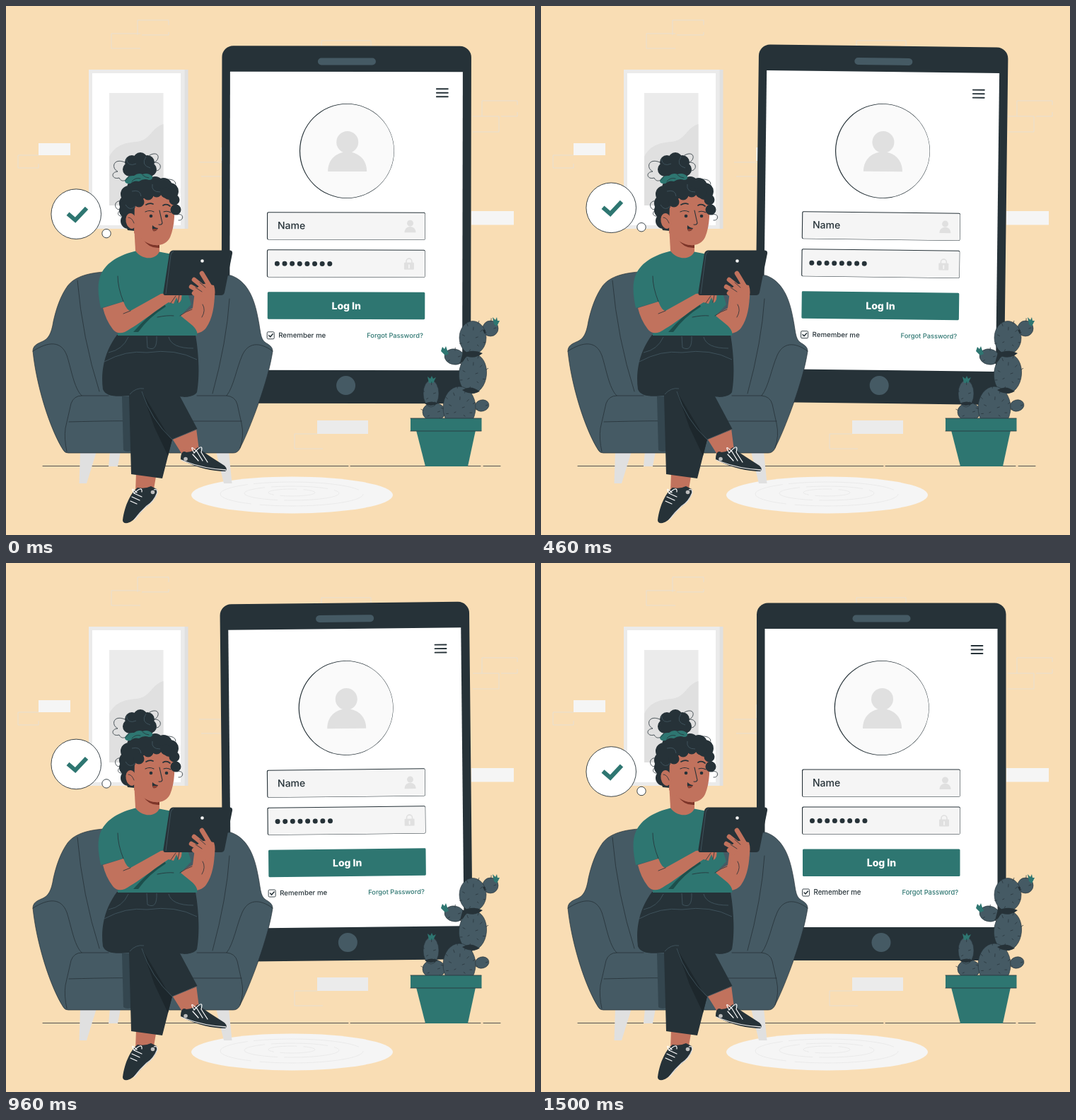
An HTML page for the animation above (1.54 s loop, 748 px wide and 748 px high).

```html
<!DOCTYPE html>
<html lang="en">
<head>
<meta charset="utf-8">
<title>Log in</title>
<style>
  html, body { margin: 0; height: 100%; overflow: hidden; background: #f9ddb4; }
  svg { display: block; width: 100vw; height: 100vh; font-family: Inter, sans-serif; }
  .dark { fill: #263238; }
  .slate { fill: #455a64; }
  .teal { fill: #2e7671; }
  .skin { fill: #c1725d; }
  .white { fill: #fff; }
  .pale { fill: #f5f5f5; }
  .light { fill: #ebebeb; }
  .grey { fill: #e0e0e0; }
  .line { fill: none; stroke: #263238; stroke-width: .8; stroke-linecap: round; }
  .seam { fill: none; stroke: #455a64; stroke-width: .8; }
  .faint { fill: none; stroke: #e8dfd0; }
  .lace { fill: none; stroke: #fff; stroke-width: 1.2; stroke-linecap: round; }
  .curls { fill: none; stroke: #263238; stroke-linecap: round; }
  .edge { stroke: #263238; stroke-width: .9; }
</style>
</head>
<body>
<svg viewBox="0 0 748 748">
  <rect width="748" height="748" fill="#f9ddb4"/>

  <g id="wall">
    <path class="faint" d="M186 41V20H230V27M230 37V41H192M190 39H149V60H190M673 156V134H723V140M723 150V156H700M660 156H697V178H660M46 211H17V229H46V223M305 221H273M276 241H305M408 626V605H440M408 626H448M446 57V49H516V57"/>
    <path class="pale" d="M46 194H91V211H46ZM658 290H718V309.500H658ZM304.500 200H330V219H304.500Z"/>
    <path class="light" d="M440 586H512V605H440ZM117 90H250V315H117Z"/>
    <path class="grey" d="M247 90H257.500V315H247Z"/>
    <path class="light" d="M247 90H252.500V315H247Z"/>
    <path class="white" d="M122 95H247V310H122Z"/>
    <path class="light" d="M146 123H222.500V282H146Z"/>
    <path class="grey" d="M146 213C155 195 172 193 184 192C205 190 205 172 222.500 167V282H146Z"/>
  </g>

  <g id="floor">
    <path class="line" d="M52 650.500H484M487 650.500H671M675 650.500H699"/>
    <ellipse class="pale" cx="404.500" cy="691.500" rx="142.500" ry="26"/>
    <g fill="none" stroke="#e8e8e8" stroke-width=".8">
      <ellipse cx="404" cy="690" rx="101" ry="17" stroke-dasharray="150 12 90 8"/>
      <ellipse cx="404" cy="689" rx="67" ry="10" stroke-dasharray="80 9"/>
      <ellipse cx="404" cy="688" rx="33" ry="5" stroke-dasharray="50 9"/>
    </g>
  </g>

  <g id="tablet">
    <rect class="dark" x="305" y="56.500" width="352.500" height="505.500" rx="16"/>
    <path class="white" d="M316.500 93H645.500V515H316.500Z"/>
    <rect class="slate" x="440.500" y="73.500" width="82" height="10" rx="5"/>
    <circle class="slate" cx="481" cy="536.500" r="13.500"/>
    <path class="line" style="stroke-width:1.800" d="M608.500 117H624.500M608.500 122.500H624.500M608.500 128H624.500"/>
    <circle class="dark" cx="481.700" cy="205" r="67"/>
    <circle cx="482.100" cy="205" r="66.200" fill="#fafafa"/>
    <circle class="grey" cx="482.500" cy="192.500" r="15.500"/>
    <path class="grey" d="M455 234C455 197 510 197 510 234Z"/>
    <g id="fields">
      <rect class="dark" x="369" y="291.500" width="223.800" height="39.200" rx="2"/>
      <rect class="pale" x="370.100" y="292.500" width="222.200" height="37.700" rx="1.500"/>
      <rect class="dark" x="369" y="344.500" width="223.800" height="39.200" rx="2"/>
      <rect class="pale" x="370.100" y="345.500" width="222.200" height="37.700" rx="1.500"/>
    </g>
    <text class="dark" x="384" y="315.500" font-size="14" font-weight="500">Name</text>
    <circle class="grey" cx="571.500" cy="307" r="4.500"/>
    <path class="grey" d="M563.500 320C563.500 309 579.500 309 579.500 320Z"/>
    <path d="M383.500 364.500H458.500" fill="none" stroke="#263238" stroke-width="7" stroke-linecap="round" stroke-dasharray="0 10.630"/>
    <rect class="grey" x="563" y="362.500" width="14" height="10" rx="1"/>
    <path d="M566 363V361A4 4 0 0 1 574 361V363" fill="none" stroke="#e0e0e0" stroke-width="1.600"/>
    <path d="M570 366V370" stroke="#f5f5f5" stroke-width="1.800" stroke-linecap="round"/>
    <rect class="teal" x="370" y="404.500" width="222.500" height="38.500" rx="1.500"/>
    <text class="white" x="481.500" y="429" font-size="14" font-weight="800" text-anchor="middle">Log In</text>
    <rect x="369.500" y="461" width="10" height="10" rx="1.500" fill="#fff" class="edge"/>
    <path class="line" style="stroke-width:1.500" d="M372 466L374 468L377.500 464"/>
    <text class="dark" x="385.500" y="469" font-size="9.700" font-weight="500">Remember me</text>
    <text class="teal" x="510.500" y="469" font-size="9.300" font-weight="500">Forgot Password?</text>
  </g>

  <g id="cactus">
    <g id="pads" class="slate edge" style="stroke-width:.6"></g>
    <path class="dark" d="M645 492Q660 484 674 491Q660 502 645 492ZM645 543Q657 535 670 545Q656 551 645 543ZM646 490Q653 500 642 505ZM674 458Q680 456 677 464ZM611 562Q600 568 592 562Q602 557 611 562Z"/>
    <path class="teal" d="M690 450L688 440L692 444L694 440L695 445L698 445L694 453ZM621 494L615 488L617 482L620 485L622 481L624 487L626 492ZM598 533L596 524L600 527L602 523L604 527L608 525L604 533Z"/>
    <path id="spines" class="line" style="stroke-width:.7"/>
    <path class="teal" d="M580 600H664L653 651H593Z"/>
    <path class="teal" d="M572 583H672.500V601H572Z"/>
    <path class="line" d="M572 601H672M572 583H672"/>
  </g>

  <g id="chair">
    <path class="grey" d="M105 630H128L114 675H103.500ZM147 630H162L158 651H145ZM297 630H315L319.500 675H308Z"/>
    <path class="slate edge" style="stroke-width:.7" d="M138 376C113 378 96 384 87 396C77 410 71 428 67 446C64 464 60 471 50 475C43 478 38 481 38 488C43 537 62 598 81 628Q83 632 88 632H321Q327 632 330 627C345 598 371 530 377 488C377 482 372 479 367 476C359 471 360 458 356 440C351 413 341 389 318 381Z"/>
    <path class="line" d="M38 488C60 474 78 473 86 494C92 512 96 540 107 551H145M107 551Q96 551 92 562L84 597Q82 612 86 630M89 588Q170 586 174 587M251 587H333M377 488C358 474 342 476 334 494C326 512 322 538 312 551H270M312 551Q324 552 327 563L333 590Q337 608 331 625M101 388Q108 470 132 545M316 414Q312 475 292 548"/>
    <path d="M164 552H176L180 628Q171 632 166 628Z" fill="#34464f"/>
  </g>

  <g id="woman">
    <path class="skin" d="M184 660H213L209 683L183 688ZM234 610L269 597L273 628L249 634Z"/>
    <path class="dark" d="M165 727C168 705 177 688 186 681Q197 683 205 679L213 683C216 690 209 700 201 706C190 714 183 728 172 731Q165 732 165 727ZM247 641C247 632 250 628 255 631Q266 630 271 624C281 633 296 641 309 650Q314 655 310 658C290 658 264 651 247 641Z"/>
    <path d="M209 684Q214 682 214 688Q209 701 199 707Q189 716 181 727M248 642Q276 654 311 656" fill="none" stroke="#e0e0e0" stroke-width="1.300"/>
    <circle cx="207.500" cy="687.500" r="2.800" fill="#bdbdbd"/><circle cx="254" cy="640.500" r="2.800" fill="#bdbdbd"/>
    <path class="lace" d="M181 689L192 694M178 694L189 699M176 700L185 704M185 688Q175 678 181 689Q193 678 192 687M264 634L272 643M270 630L278 643M276 631L285 645M270 630Q258 618 266 632Q280 616 276 631"/>

    <path class="dark" d="M157 465H268C274 500 273 530 270 546C266 553 252 554 246 552L270.500 598L235 613L221 668L177 662L174 551C155 553 141 552 137 542C133 511 142 485 157 465Z"/>
    <path fill="#1d272c" d="M192 545Q205 567 231 610L235 613L229 636L210 596Z"/>
    <path class="seam" d="M175 549Q184 539 195 541M192 545Q205 585 235 613L269 599M199 467L200 483Q214 490 213 467M145 490Q165 486 173 468M230 468Q234 484 265 484M139 503Q170 486 199 490Q240 484 270 500"/>

    <path class="skin" d="M295 405C295 424 292 442 283 455C278 462 268 465 262 461C253 454 247 444 246 437L264 427L267 404Z"/>
    <path class="teal" d="M185 346C160 352 142 362 134 380C128 394 131 413 134 427L166 418C164 440 158 454 158 466H270Q272 460 264 452L247 438L262 422L240 352L214 347Z"/>
    <path d="M180 461Q200 438 224 421L226 425Q202 440 187 461Z" fill="#1d4f4c"/>
    <path class="line" d="M166 418Q158 398 158 382M214 440Q228 437 237 438M246 438Q254 432 263 429"/>

    <path class="skin" d="M137 427L166 418Q171 431 176 431L219 407L248 404Q250 417 244 420L241 412L237 421L230 419C215 428 190 449 168 461Q157 465 151 457Q141 444 137 427Z"/>
    <path class="line" d="M166 435L176 431M240 410L233 420M245 409L243 419"/>
    <path class="dark" d="M236 345.500H317Q320.500 346 320 350L309 405Q308 409 304 409H225Q222 409 222.500 405L231 350Q232 346 236 345.500Z"/>
    <path class="seam" d="M237 347Q234 348 233 352L226 407"/>
    <circle cx="277.500" cy="360.500" r="2.300" fill="#f5f5f5"/>
    <path class="skin" d="M267 402Q276 391 284 393L294 395Q297 404 294 416L268 424Z"/>
    <path fill="none" stroke="#c1725d" stroke-width="6.500" stroke-linecap="round" d="M290 400Q285 391 277 378M282 400L266 387M276 405L262 397M272 410L266 406"/>
    <path class="line" d="M274 391L282 398M268 398L277 404M277 440Q283 430 278 422"/>

    <g id="head">
      <path class="skin" d="M181 310L217 333V347C211 361 190 358 183 346Z"/>
      <path d="M194 330Q206 340 217 338V342Q202 343 194 330Z" fill="#7d3529"/>
      <path class="dark" d="M170 268Q158 292 168 306L172 317L182 318L190 280L240 270L222 247L190 248Z"/>
      <path class="curls" stroke-width="22" d="M171 289h0M173 304h0"/>
      <path class="skin" d="M182 276L200 264H238C239 290 239 311 232 327C225 342 205 340 195 332L181 321Z"/>
      <ellipse class="skin" cx="177" cy="304" rx="7.500" ry="11" transform="rotate(-12 177 304)"/>
      <path class="line" d="M173 299Q178 299 181 307"/>
      <path class="curls" stroke-width="24" d="M172 279h0M174 266h0M183 257h0M197 252h0M211 253h0M223 255h0M232 262h0M187 263h0"/>
      <path class="curls" stroke-width="15" d="M238 274h0M240 288h0M226 264h0M213 263h0M201 267h0M188 277h0"/>
      <path class="curls" stroke-width="20" d="M175 231h0M178 221h0M190 217h0M200 221h0M203 231h0M190 232h0M181 236h0M198 236h0"/>
      <path class="teal" d="M168 247Q171 239 181 240Q187 235 193 238Q201 235 207 241Q208 246 202 246Q195 243 188 248Q181 246 176 251Q168 252 168 247Z"/>
      <path class="line" d="M178 248Q183 242 190 244M193 239Q198 243 202 243"/>
      <path class="line" d="M168 221C152 214 148 229 158 234C147 235 150 246 160 243C164 251 172 246 174 240M203 211C216 204 219 216 210 221C222 221 220 234 211 233M164 276C151 273 152 290 163 288C153 294 162 300 168 296M242 295C252 292 252 304 244 303M226 245Q240 244 240 252"/>
      <path class="seam" d="M170 216Q172 228 184 223M198 213Q190 225 204 229M178 262Q190 259 191 269M207 252Q205 263 218 263M169 281Q175 291 183 283"/>
      <path class="line" style="stroke-width:1.700" d="M198 281Q203 278 208 280M222 282Q227 279 232 283"/>
      <circle class="dark" cx="205" cy="297" r="2.300"/><circle class="dark" cx="227" cy="297" r="2.300"/>
      <path class="line" style="stroke-width:1.100" d="M197 291Q203 288 209 291M223 291Q228 289 233 292M217 289L221 307Q220 310 216 309"/>
      <path class="dark" d="M207 310Q211 314 215 314Q213 319 208 318Q206 314 207 310Z"/>
      <path d="M208 315L214 315Q212 319 208 318Z" fill="#8e3f31"/>
    </g>
  </g>

  <g id="bubble" class="white edge">
    <circle cx="99.200" cy="295" r="35.300"/>
    <circle cx="142" cy="322.500" r="6.200"/>
    <path d="M87.500 294.500L98 303.500L114 286.500" style="stroke:#2e7671;stroke-width:6;fill:none"/>
  </g>
</svg>
<script>
  const byId = id => document.getElementById(id);

  // Cactus pads: centre, radii, tilt in degrees
  const pads = [
    [605, 574, 16, 13, 0], [673, 565, 10, 8, -15], [601, 548, 11, 19, 0],
    [660, 520, 19.5, 28, 5], [641, 568, 23, 30, 0], [634, 496, 14, 11, 10],
    [685, 456, 11, 11, 0], [660, 469, 19, 23.5, 0]
  ];
  byId('pads').innerHTML = pads.map(([x, y, rx, ry, tilt]) =>
    `<ellipse cx="${x}" cy="${y}" rx="${rx}" ry="${ry}" transform="rotate(${tilt} ${x} ${y})"/>`).join('');

  let spines = '';
  for (const [x, y, rx, ry] of pads) {
    const count = Math.round(rx * ry / 38);
    for (let i = 0; i < count; i++) {
      const angle = i * 2.4, reach = Math.sqrt((i + .6) / count);
      const dx = Math.cos(angle), dy = Math.sin(angle);
      spines += `M${x + rx * reach * dx} ${y + ry * reach * dy}l${dx * 3} ${dy * 3 - 1}`;
    }
  }
  byId('spines').setAttribute('d', spines);

  const LOOP = 1540, STEPS = 37;
  const triangle = p => 1 - Math.abs(1 - 2 * (p - Math.floor(p)));

  function draw(now) {
    const step = Math.floor((now % LOOP + 5) / (LOOP / STEPS));
    const p = (step + 1) / STEPS;
    const tilt = 2 * triangle(p + .25) - 1;
    byId('tablet').setAttribute('transform', `rotate(${tilt} 481.2 309.2)`);
    byId('bubble').setAttribute('transform', `translate(0 ${-15 * triangle(p)})`);
  }

  const start = performance.now();
  function tick() {
    draw(performance.now() - start);
    requestAnimationFrame(tick);
  }
  tick();
</script>
</body>
</html>
```
